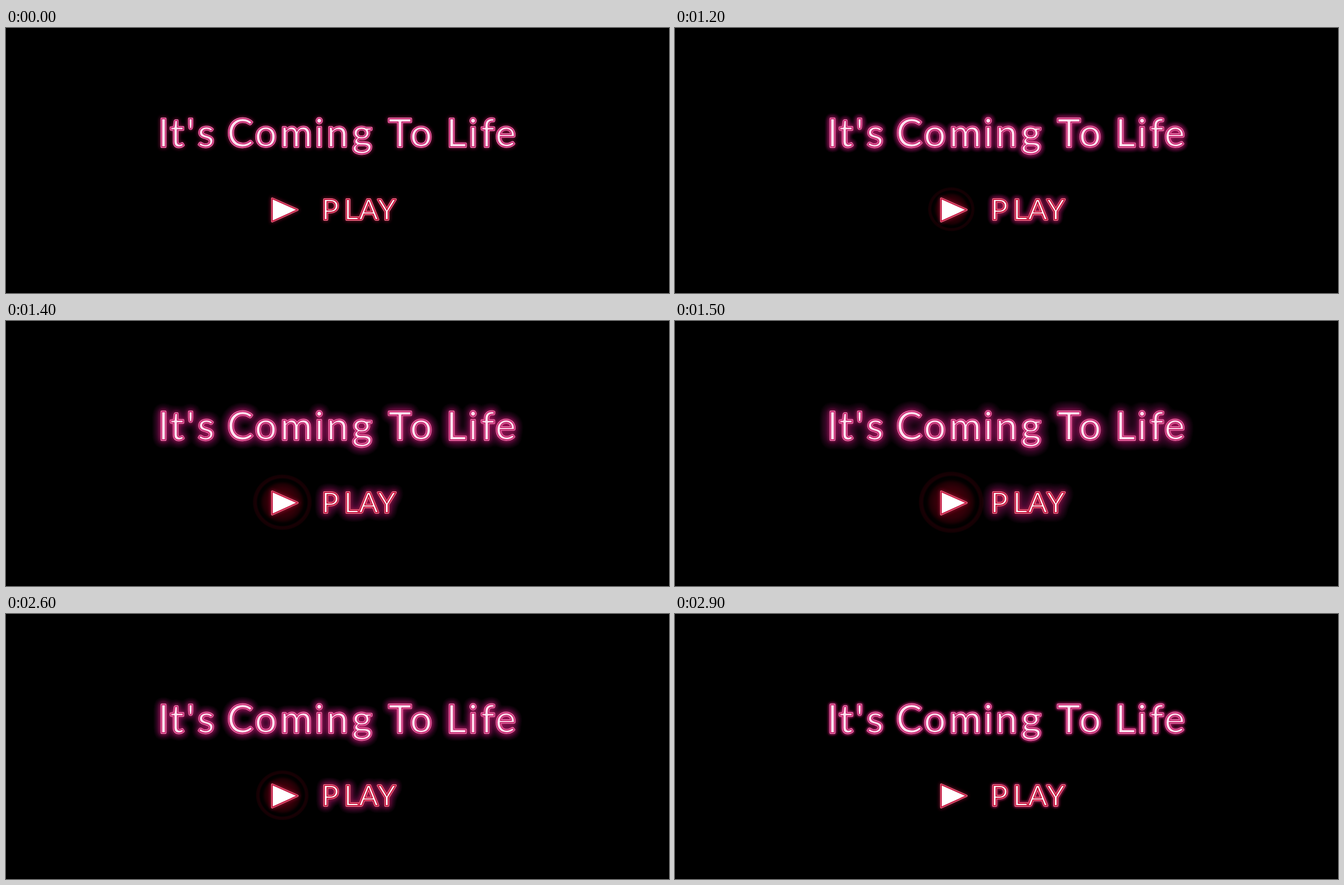
An HTML page for the animation above (3 s loop, 1183 by 473 pixels).

```html
<!DOCTYPE html>
<html lang="en">
<head>
<meta charset="utf-8">
<title>Neon glow</title>
<style>
  html, body { margin: 0; width: 100%; height: 100%; overflow: hidden; background: #000; }
  svg { display: block; width: 100vw; height: 100vh; }
  text { font-family: Lato, sans-serif; text-anchor: middle; }
  use { stroke-linejoin: round; }
  .near { stroke-width: 6; filter: url(#soft); opacity: .6; }
  .edge { stroke-width: 3.8; }
  .core { stroke-width: 2.1; }
</style>
</head>
<body>
<svg viewBox="0 0 1183 473">
  <defs>
    <text id="title" y="212" font-size="70" x="281 305 329.5 357 385 418 463.5 518 559 591.5 635.5 668 703 740.5 776 803.5 833.5 859.5 891.5">It's Coming To Life</text>
    <text id="play" y="342" font-size="51" x="578.5 616 647 679.5">PLAY</text>
    <path id="arrow" d="M475 304.5L520 324.5L475 345Z"/>
    <filter id="soft" filterUnits="userSpaceOnUse" x="0" y="0" width="1183" height="473">
      <feGaussianBlur stdDeviation="3.2"/>
    </filter>
    <filter id="halo" filterUnits="userSpaceOnUse" x="200" y="90" width="783" height="330" color-interpolation-filters="sRGB">
      <feGaussianBlur id="spread" stdDeviation="1"/>
      <feComponentTransfer result="mask">
        <feFuncA type="gamma" amplitude="1" exponent=".35" offset="-.2"/>
      </feComponentTransfer>
      <feFlood flood-color="#961468"/>
      <feComposite operator="in" in2="mask"/>
    </filter>
    <radialGradient id="rings">
      <stop offset="0" stop-color="#5a000c"/>
      <stop offset=".5" stop-color="#300008"/>
      <stop offset=".64" stop-color="#1e0004"/>
      <stop offset=".74" stop-color="#040000"/>
      <stop offset=".82" stop-color="#000"/>
      <stop offset=".88" stop-color="#190004"/>
      <stop offset=".96" stop-color="#140003"/>
      <stop offset="1" stop-color="#000"/>
    </radialGradient>
  </defs>
  <rect width="1183" height="473"/>
  <ellipse id="ripple" cx="493" cy="323.5" fill="url(#rings)"/>
  <g filter="url(#halo)" stroke="#000" stroke-width="3">
    <use href="#title"/><use href="#play"/>
  </g>

  <g class="near" fill="#c2185f" stroke="#c2185f"><use href="#title"/></g>
  <g class="near" fill="#b0123c" stroke="#b0123c"><use href="#play"/><use href="#arrow"/></g>

  <g class="edge" stroke="#ff8cc0"><use href="#title"/></g>
  <g class="edge" stroke="#ff8098"><use href="#play"/><use href="#arrow"/></g>

  <g class="core" fill="#ffe4f1" stroke="#c42a70"><use href="#title"/></g>
  <g class="core" fill="#fff" stroke="#c31c44"><use href="#play"/><use href="#arrow"/></g>
</svg>
<script>
const spread = document.getElementById("spread");
const ripple = document.getElementById("ripple");
const clamp = v => Math.max(0, Math.min(1, v));

// Glow level moves in sixths, one step every 100 ms.
function levelAt(ms) {
  if (ms < 1000) return 0;
  const step = Math.floor(ms / 100);
  return ms < 2500 ? Math.min(6, step - 9) / 6 : (30 - step) / 6;
}

function draw(now) {
  const level = levelAt(now % 3000);
  const radius = 24 + 31.5 * level;
  spread.setAttribute("stdDeviation", 0.5 + 8.5 * level);
  ripple.setAttribute("rx", radius * 1.06);
  ripple.setAttribute("ry", radius);
  ripple.setAttribute("opacity", clamp((level - 0.2) * 3));
  requestAnimationFrame(draw);
}
draw(performance.now());
</script>
</body>
</html>
```
